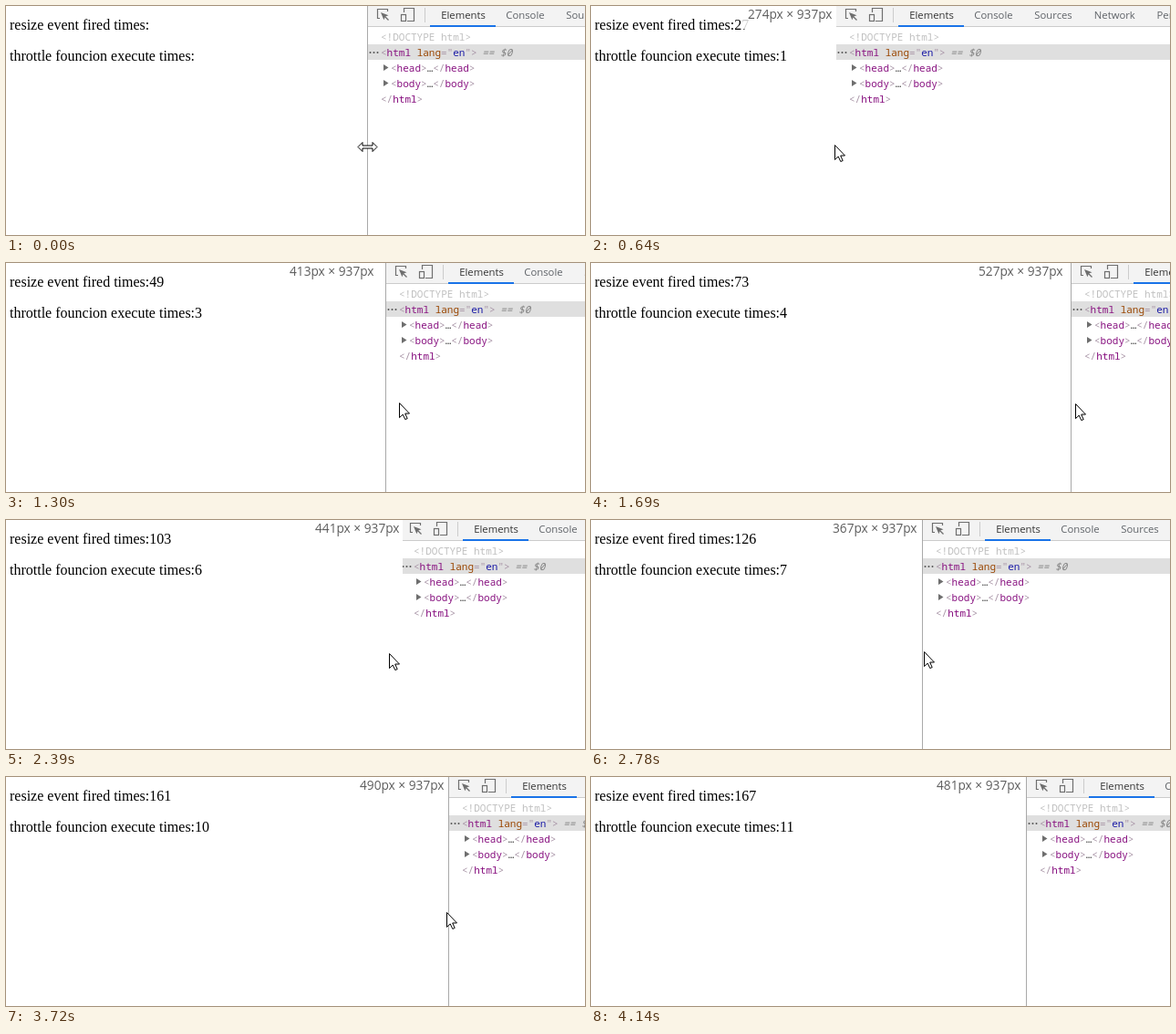
Recreate the animation shown at these times as an HTML page. Size 635 px wide and 251 px high, loop 4420 ms.

```html
<!DOCTYPE html>
<html lang="en">
<head>
<meta charset="utf-8">
<title>Throttled resize</title>
<style>
  html, body { margin: 0; width: 100%; height: 100%; overflow: hidden; background: #fff; }
  svg { display: block; }
  text { white-space: pre; }
  .page { font: 16px "Liberation Serif", serif; }
  .size { font: 13.7px "Open Sans", sans-serif; fill: rgba(0, 0, 0, .64); text-anchor: end; }
  .tabs { font: 11.3px "Open Sans", sans-serif; fill: #5f6368; }
  .tabs .active { fill: #333; }
  .code { font: 11px "Noto Sans Mono", monospace; fill: #a894a6; }
  .code .name { fill: #881280; }
  .code .attr { fill: #994500; }
  .code .value { fill: #1a1aa6; }
  .code .doctype { fill: #c0c0c0; }
  .code .more { fill: #333; }
  .code .hint { fill: #808080; font-style: italic; }
  .icon { fill: none; stroke: #6e6e6e; stroke-width: 1.2; }
  .pointer { fill: #fff; stroke: #000; }
</style>
</head>
<body>
<svg width="635" height="251" viewBox="0 0 635 251">
  <g class="page">
    <text x="4" y="26">resize event fired times:<tspan id="fired"></tspan></text>
    <text x="4" y="60">throttle founcion execute times:<tspan id="executed"></tspan></text>
  </g>

  <g id="overlay">
    <rect x="-108" width="104" height="25" fill="#fff" opacity=".8"/>
    <text id="size" class="size" x="-9.5" y="14"></text>
  </g>

  <g id="panel">
    <rect width="640" height="251" fill="#fff"/>
    <rect width="640" height="23" fill="#f3f3f3"/>
    <rect y="22" width="640" height="1" fill="#ccc"/>
    <rect y="42" width="640" height="17" fill="#dfdfdf"/>
    <g class="icon">
      <path d="M14 13.5H11.5V3.5H22.5V6"/>
      <path d="M15 7L23.5 10.2L20 11.6L18.4 15.2Z" fill="#6e6e6e" stroke="none"/>
      <path d="M19.5 11.5L23.5 15.5"/>
      <path d="M40.5 7V2.5H51.5V16.5H44"/>
      <rect x="37.5" y="9.5" width="5" height="7"/>
    </g>
    <rect x="63" y="2" width="1" height="16" fill="#ccc"/>
    <rect x="69" y="21" width="72" height="2" fill="#1a73e8"/>
    <g class="tabs">
      <text class="active" x="81.2" y="14">Elements</text>
      <text x="152.3" y="14">Console</text>
      <text x="218.3" y="14">Sources</text>
      <text x="283.8" y="14">Network</text>
      <text x="352.5" y="14">Performance</text>
    </g>
    <g fill="#555">
      <circle cx="3.5" cy="51" r="1"/><circle cx="7.5" cy="51" r="1"/><circle cx="11.5" cy="51" r="1"/>
    </g>
    <path d="M18 64l5.5 3.5l-5.5 3.5zM18 81l5.5 3.5l-5.5 3.5z" fill="#6e6e6e"/>
    <g class="code">
      <text x="15" y="38" class="doctype">&lt;!DOCTYPE html&gt;</text>
      <text x="15" y="55">&lt;<tspan class="name">html</tspan> <tspan class="attr">lang</tspan>="<tspan class="value">en</tspan>"&gt;<tspan class="hint" dx="-1"> == $0</tspan></text>
      <text x="26" y="72">&lt;<tspan class="name">head</tspan>&gt;<tspan class="more">…</tspan>&lt;/<tspan class="name">head</tspan>&gt;</text>
      <text x="26" y="89">&lt;<tspan class="name">body</tspan>&gt;<tspan class="more">…</tspan>&lt;/<tspan class="name">body</tspan>&gt;</text>
      <text x="15" y="106">&lt;/<tspan class="name">html</tspan>&gt;</text>
    </g>
    <rect id="seam" height="251"/>
  </g>

  <path id="resizer" class="pointer" transform="translate(396.5 154.5)"
        d="M-10.5 0L-5.5 -5V-1.5H5.5V-5L10.5 0L5.5 5V1.5H-5.5V5Z"/>
  <path id="arrow" class="pointer" d="M.5 .5V16.5L4.2 13L6.8 18.5L9.2 17.5L6.7 12H11.5Z"/>
</svg>

<script>
const LOOP = 4420;
const DRAG_START = 216;
const BEAT = 134;       // ms between screen refreshes
const LAST_BEAT = 29;   // the pointer has left the stage
const LABEL_LAG = 0.14; // beats
const POINTER_LEAD = 0.32;

// Key points are [beat, value].
const dragTurns = [[-1, 396], [3.3, 266.7], [12.1, 536.3], [19, 363], [23.5, 496], [28, 477]];
const firedCounts = [[0, 3], [3, 27], [8, 49], [11, 73], [16, 103], [22, 149], [28, 167]];
const pointerHeights = [[3, 152], [11, 154], [16, 146], [22, 141], [27, 150], [28, 245]];
const pointerExit = [[27, 0], [28, 62]];

const linear = p => p;
const swing = p => (1 - Math.cos(Math.PI * p)) / 2;

function sample(points, beat, ease = linear) {
  const next = points.findIndex(point => point[0] > beat);
  if (next === 0) return points[0][1];
  if (next < 0) return points[points.length - 1][1];
  const [from, a] = points[next - 1], [to, b] = points[next];
  return a + (b - a) * ease((beat - from) / (to - from));
}

const edgeAt = beat => sample(dragTurns, beat, swing);

const $ = id => document.getElementById(id);
const set = (id, name, value) => $(id).setAttribute(name, value);
const move = (id, x, y = 0) => set(id, "transform", `translate(${Math.round(x)} ${Math.round(y)})`);
const show = (id, visible) => set(id, "visibility", visible ? "visible" : "hidden");

function render(beat) {
  const dragged = beat >= 0;
  const edge = edgeAt(beat);
  const lateEdge = edgeAt(beat - LABEL_LAG);
  const width = Math.round(lateEdge + 4);

  $("fired").textContent = dragged ? Math.round(sample(firedCounts, beat)) : "";
  $("executed").textContent = Math.max(0, Math.floor(beat * 0.41)) || "";
  $("size").textContent = `${width}px × 937px`;
  move("overlay", width);
  move("panel", edge);

  // Moving left, the late page hides the border and a sliver of the panel.
  const sliver = dragged ? Math.round((lateEdge - edge) / 2) : 0;
  set("seam", "width", Math.max(1, sliver));
  set("seam", "fill", sliver > 0 ? "#fff" : "#a9a9a9");

  move("arrow", edgeAt(beat + POINTER_LEAD) + sample(pointerExit, beat), sample(pointerHeights, beat));
  show("overlay", dragged);
  show("resizer", !dragged);
  show("arrow", dragged && beat < LAST_BEAT);
}

const start = performance.now();
function tick() {
  const elapsed = (performance.now() - start) % LOOP;
  render(Math.min(LAST_BEAT, Math.floor((elapsed - DRAG_START) / BEAT)));
  requestAnimationFrame(tick);
}
tick();
</script>
</body>
</html>
```
